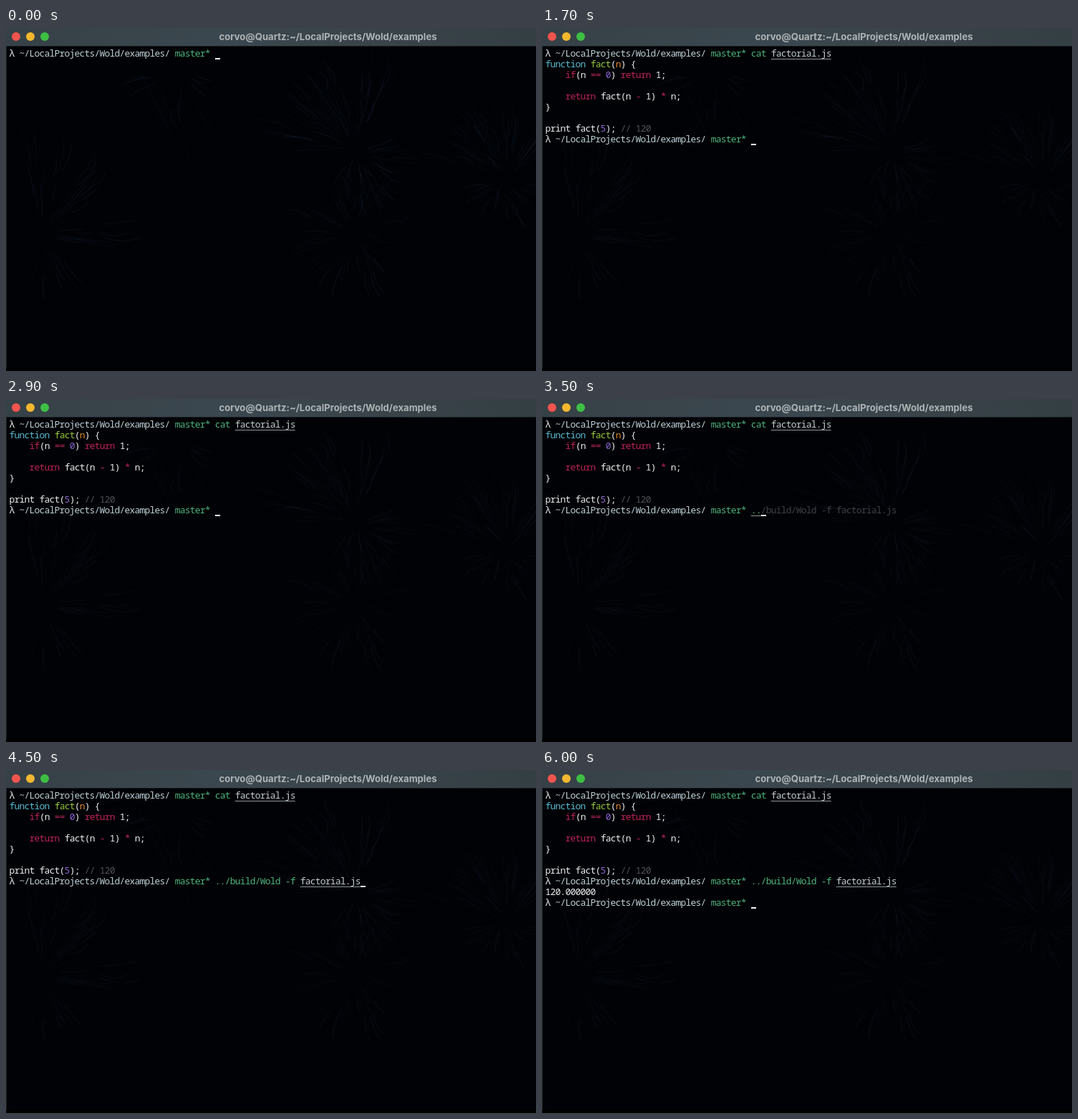
An HTML page with a canvas that plays this animation: 740 px wide and 480 px high, repeating every 6500 ms.

```html
<!DOCTYPE html>
<html lang="en">
<head>
<meta charset="utf-8">
<style>
  html, body { margin: 0; width: 100%; height: 100%; overflow: hidden; background: #010206; }
  #stage { position: relative; width: 740px; height: 480px; overflow: hidden; }
  #stage > * { position: absolute; }
  #needles { left: 0; top: 0; }
  #bar {
    left: 0; top: 0; width: 740px; height: 26px; box-sizing: border-box;
    background: linear-gradient(90deg, #364147, #3b474e 40%, #394349 70%, #343f44);
    border-bottom: 1px solid #161c20;
  }
  #bar i { position: absolute; top: 6px; width: 12px; height: 12px; border-radius: 50%; }
  #title {
    left: 249px; top: 0; width: 401px; text-align: center; white-space: nowrap;
    font: 700 13.1px/24px Inter, "Open Sans", sans-serif; color: #adb4b7;
  }
  #edge { left: 0; top: 26px; width: 1px; height: 450px; background: #20262a; }
  #foot { left: 0; top: 476px; width: 740px; height: 4px; background: #000; }
  #term {
    left: 4.6px; top: 27.5px; margin: 0; color: #eceff0; font-variant-ligatures: none;
    font: 13px/15px "Noto Sans Mono", "DejaVu Sans Mono", monospace;
    letter-spacing: calc(7px - 0.6em);
  }
  .dir { color: #bfd2d6; }
  .ok { color: #4fb47f; }
  .bad { color: #d8464c; }
  .ghost { color: #3d4147; }
  .file { color: #c3cfd2; }
  .under { text-decoration: underline 1px #8b9699; text-underline-offset: 3px; text-decoration-skip-ink: none; }
  .type { color: #58bcd2; }
  .name { color: #96c93a; }
  .arg { color: #e08a2c; }
  .key { color: #bd2458; }
  .num { color: #8d66d0; }
  .note { color: #505357; }
  .cursor { position: relative; }
  .cursor::after {
    content: ""; position: absolute; left: 0.4px; bottom: 0;
    width: 7px; height: 2px; background: #f2f5f5;
  }
</style>
</head>
<body>
<div id="stage">
  <canvas id="needles" width="740" height="480"></canvas>
  <div id="bar">
    <i style="left:8px;background:#f2544e"></i>
    <i style="left:28px;background:#f4b72f"></i>
    <i style="left:48px;background:#3dc043"></i>
  </div>
  <div id="title">corvo@Quartz:~/LocalProjects/Wold/examples</div>
  <div id="edge"></div>
  <div id="foot"></div>
  <pre id="term"></pre>
</div>
<script>
const LOOP = 6500;
const term = document.getElementById("term");
const needles = document.getElementById("needles");

const span = (cls, text) => `<span class="${cls}">${text}</span>`;
const cursor = span("cursor", "");
const prompt = `λ ${span("dir", "~/LocalProjects/Wold/examples/")} ${span("ok", "master*")} `;

const listing = [
  `${span("type", "function")} ${span("name", "fact")}(${span("arg", "n")}) {`,
  `    ${span("key", "if")}(n ${span("key", "==")} ${span("num", "0")}) ${span("key", "return")} 1;`,
  "",
  `    ${span("key", "return")} fact(n ${span("key", "-")} 1) ${span("key", "*")} n;`,
  "}",
  "",
  `print fact(${span("num", "5")}); ${span("note", "// 120")}`
];

// keys: [time, number of characters typed]
const commands = [
  {
    text: "cat factorial.js", enter: 1600, output: listing,
    keys: [[0, 0], [400, 1], [500, 2], [600, 3], [800, 4], [900, 5], [1300, 16]]
  },
  {
    text: "../build/Wold -f factorial.js", enter: 4700, output: ["120.000000"],
    keys: [[0, 0], [3200, 1], [3400, 2], [3600, 3], [3900, 29]]
  }
];

function highlight(typed) {
  return typed.split(" ").map((word, i) => {
    if (i === 0) {
      const cls = /^ca?$/.test(word) ? "bad" : "ok";
      return span(/^\.\.\/?$/.test(word) ? cls + " under" : cls, word);
    }
    return span(word[0] === "-" ? "ok" : "file under", word);
  }).join(" ");
}

function screen(t) {
  const rows = [];
  for (const { text, enter, output, keys } of commands) {
    if (t >= enter) {
      rows.push(prompt + highlight(text), ...output);
      continue;
    }
    const count = keys.filter(key => t >= key[0]).pop()[1];
    const rest = count ? span("ghost", text.slice(count)) : "";
    rows.push(prompt + highlight(text.slice(0, count)) + cursor + rest);
    return rows.join("\n");
  }
  return [...rows, prompt + cursor].join("\n");
}

// Faint sprays of pine needles behind the text
function drawNeedles() {
  const ctx = needles.getContext("2d");
  let seed = 11;
  const rand = (a, b) => {
    seed = (seed * 16807) % 2147483647;
    return a + (b - a) * seed / 2147483647;
  };
  const stroke = (x0, y0, cx, cy, x1, y1) => {
    ctx.strokeStyle = `rgba(40,64,82,${rand(0.06, 0.16)})`;
    ctx.lineWidth = rand(0.8, 2);
    ctx.beginPath();
    ctx.moveTo(x0, y0);
    ctx.quadraticCurveTo(cx, cy, x1, y1);
    ctx.stroke();
  };
  // x, y, radius, needles, start and end angle
  const sprays = [
    [488, 168, 150, 60, 3.1, 5.2], [488, 175, 95, 40, -0.6, 2.2],
    [485, 285, 105, 60, 0, 6.28], [700, 210, 130, 55, 3.4, 5.6],
    [690, 215, 75, 30, 0, 3.1], [50, 285, 150, 40, 4.3, 6.5],
    [50, 290, 110, 18, 0, 2], [240, 60, 110, 18, 0.1, 3]
  ];
  ctx.lineCap = "round";
  for (const [x, y, r, n, from, to] of sprays) {
    for (let i = 0; i < n; i++) {
      const a = rand(from, to), inner = r * rand(0.1, 0.65), outer = inner + r * rand(0.15, 0.4);
      const bend = a + rand(0, 0.12), mid = (inner + outer) / 2;
      stroke(
        x + inner * Math.cos(a), y + inner * Math.sin(a),
        x + mid * Math.cos(bend), y + mid * Math.sin(bend),
        x + outer * Math.cos(a), y + outer * Math.sin(a)
      );
    }
  }
  stroke(186, 58, 212, 110, 228, 145);
  stroke(203, 68, 245, 145, 258, 196);
}

function frame(now) {
  const t = now % LOOP;
  const html = screen(t);
  if (html !== frame.last) term.innerHTML = frame.last = html;
  needles.style.opacity = t < 1600 ? 1 : 0.75;
  requestAnimationFrame(frame);
}

drawNeedles();
frame(performance.now());
</script>
</body>
</html>
```
